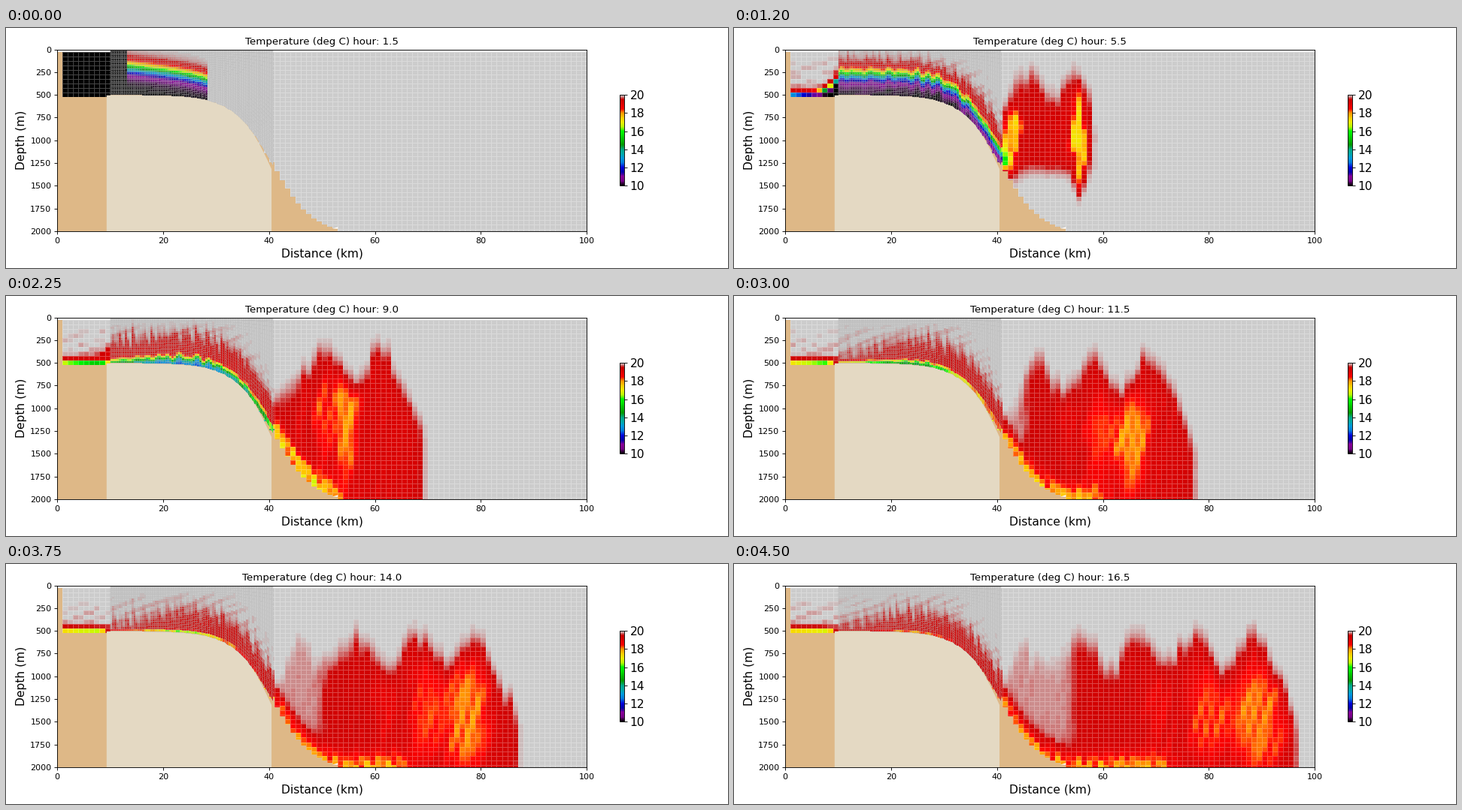
Animation, 960 px wide and 320 px high, one loop 4.65 s. Source, as a matplotlib script:

```python
import numpy as np
import matplotlib.pyplot as plt
from matplotlib.animation import FuncAnimation

FRAMES, STEP = 31, 150
W, H, DPI = 960, 320, 80
TAN, PALE = "#deb887", "#e4d9c3"
SPILL = 5.5  # hour when the shelf has emptied half way

rng = np.random.default_rng(4)
WAVES = rng.uniform([.6, .6, 0, -1.5], [3.2, 3, 2 * np.pi, 1.5], (8, 4))


def wiggle(x, z, t):
    return sum(np.sin(a * x + b * z + p + w * t) for a, b, p, w in WAVES) / 2


def sig(v):
    return 1 / (1 + np.exp(-np.clip(v, -40, 40)))


def ramp(v, a, b):
    return np.clip((v - a) / (b - a), 0, 1)


def fade(t, scale):
    return np.exp(-max(t - SPILL, 0) / scale)


def bell(v, centre, width):
    return np.exp(-((v - centre) / width) ** 2)


def blob(x, z, cx, cz, rx, rz):
    return np.exp(-(((x - cx) / rx) ** 2 + ((z - cz) / rz) ** 2) ** 2)


def bed(x):
    return np.minimum(500 + 770 * (1 + np.tanh((x - 40.8) / 7.6)), 2000)


def front(t):
    return np.interp(t, [1.5, 3.8, 5.5, 9, 11.5, 16.5],
                     [28.5, 40, 57.9, 69, 77.2, 96.5])


def exchange(x, t):
    """Height of the tilted interface while both fronts run apart."""
    edge = 20.85 - 5.1 * t
    tilt = 310 - 95 * ramp(x, edge, front(t)) - 110 * ramp(x, 29, 40)
    return np.where(x < edge, 900, tilt)


def drained(x, t):
    """Height, strength and width of the cold layer, and height of the mixed one."""
    late = t - SPILL
    top = 8 + 222 * fade(t, 3) * (1 - .55 * sig((x - 33) / 2.5))
    top = top * np.exp(-.4 * max(late, 0) * np.maximum((25 - x) / 15, 0) ** 2)
    amp = (10 - .6 * late) * (1 - .5 * sig((x - 30) / 2) * ramp(t, 8, 12))
    amp = amp * (1 - .42 * bell(x, 14, 6) * bell(t, 7.3, 1))
    lift = (340 - 10 * late) * (1 - .75 * ramp(t, 8, 11) * bell(x, 10, 9))
    width = 42 * fade(t, 6)

    # The basin behind the sill keeps only a thin layer
    sill = (np.minimum(x, 10) / 10) ** 6
    basin = x < 10
    top = np.where(basin, 45 + (top - 45) * sill, top)
    lift = np.where(basin, 95 + (lift - 95) * sill, lift)
    pool = 2.6 + 5 * fade(t, 1.5) + .6 * x * fade(t, 5)
    amp = np.where(basin, np.minimum(pool, 10), amp)
    width = np.where(basin, .3 * width, width)
    return top, amp, width, lift


def shelf(x, z, t, floor):
    """Temperature deficit on the shelf."""
    h = floor - z
    m = ramp(t, 3.7, SPILL)
    open_ = x >= 10
    top, amp, width, lift = drained(x, t)
    rough = .07 + .12 * ramp(t, SPILL, 8)
    top = top * (1 + rough * wiggle(1.1 * x, 0, t) * open_)
    lift = lift + 42 * wiggle(1.7 * x, h / 260, t) * open_

    top = exchange(x, t) * (1 - m) + top * m
    amp = 10 * (1 - m) + amp * m
    width = 42 * (1 - m) + width * m
    cold = amp * sig((top - h) / width)
    mix = m * (.8 - .2 * ramp(t, 9, 11)) * sig((lift - h) / np.where(open_, 45, 14))
    streak = np.clip(wiggle(.5 * x, z / 40, .5 * t), 0, 1)
    haze = .13 * m * streak * sig((z - 90) / 15) * sig((lift + 270 - h) / 50)
    return (np.maximum(cold, mix) + haze) * (x < front(t))


def cores(x, z, t):
    """Colder water inside the plume: a nose, trailing cores and a gap."""
    f = front(t)
    x = x + .5 * wiggle(.3 * x, z / 250, .6 * t)
    a = 1.8 * fade(t, 1.4) * blob(x, z, f - 2.3, 960, 1.2, 560)
    cx = f - 16.5 + abs(t - 7)
    cz = 800 + 700 * (1 - np.exp(-max(t - 7, 0) / 3))
    rx = max(1.2 + .42 * (t - 6), .9)
    for k, strength in enumerate((1, .75, .4)):
        a = a + (strength * (.95 + .9 * fade(t, 3)) * ramp(t, 4.2, SPILL)
                 * blob(x, z, cx - 1.7 * k * rx, cz - 60 * k,
                        rx * (1 - .25 * k), 640 - 110 * k))
    return a - .8 * bell(t, 7, .8) * blob(x, z, f - 9.3, 1650, 1.3, 650)


def plume_top(x, t):
    """Billows on a level that sinks with time and dips at both ends."""
    f = front(t)
    crest = f - 2 - 6 * ramp(t, 6, 9)
    level = min(420 + 45 * (t - SPILL), 780)
    top = level - 170 * np.cos(2 * np.pi * (x - crest) / 11)
    top = top + (300 + 450 * ramp(t, 6, 9)) * np.exp(-np.maximum(f - x, 0) / 2.2)
    top = top + 380 * np.exp(-np.maximum(x - 41, 0) / 2.5)
    return top + 50 * wiggle(2.3 * x, 0, t)


def deep(x, z, t):
    """Temperature deficit of the plume beyond the slope."""
    f = front(t)
    if f < 41:
        return np.zeros_like(x)
    h = bed(x) - z
    base = 1300 + 600 * max(t - SPILL, 0) + 280 * bell(x, f - 2.3, 1.3)
    body = sig((z - plume_top(x, t)) / 65) * sig((base - z) / 45)

    # Upstream the plume thins to a pale wake above a bottom layer
    keep = sig((x - max(40, 41 + 1.8 * (t - 9))) / .5)
    body = body * (keep + (1 - keep) * np.maximum(.3, sig((220 - h) / 40)))
    xi = (x - 41) / (f - 41)
    amp = .62 + .33 * sig((xi - .45) * 12) * sig((.93 - xi) * 30)
    a = body * np.maximum(amp + cores(x, z, t), 0)
    a = a * (1 + .07 * wiggle(x, z / 150, t))

    thick = 170 + 180 * bell(t, 6.8, 1.8)
    reach = 44 + 2.6 * (t - SPILL)
    a = a + ((1.2 + 2.8 * fade(t, 3)) * bell(h, 0, thick)
             * sig((reach - x) / 1.2) * sig((base - z) / 45)
             * (1 + .2 * wiggle(1.5 * x, z / 90, t)))
    return a * sig((f - x) / .3)


# Coarse 1 km grid, and a fine grid that follows the bed
cx, cz = np.arange(1, 101), np.r_[np.arange(25, 2000, 50), 2000]
CX, CZ = np.meshgrid(cx[:-1] + .5, np.arange(50, 2001, 50))
FX, FS = np.meshgrid(np.linspace(10, 40.8, 78), np.linspace(0, 1, 25))
FZ = FS * bed(FX)


def mid(a):
    return (a[1:, 1:] + a[:-1, 1:] + a[1:, :-1] + a[:-1, :-1]) / 4


MX, MZ = mid(FX), mid(FZ)


def coarse_temp(t):
    floor = np.where(CX < 10, 525, bed(CX))
    return 20 - np.where(CX < 40.8, shelf(CX, CZ, t, floor), deep(CX, CZ, t))


def fine_temp(t):
    return 20 - shelf(MX, MZ, t, bed(MX))


def box(x, y, w, h):
    return [x / W, 1 - (y + h) / H, w / W, h / H]


fig = plt.figure(figsize=(W / DPI, H / DPI), dpi=DPI, facecolor="white")
ax = fig.add_axes(box(68.15, 28.7, 704, 242.1), facecolor="#eeeeee")
look = dict(cmap="nipy_spectral", vmin=10, vmax=20)
coarse = ax.pcolormesh(cx, cz, coarse_temp(1.5), zorder=1, linewidth=.5,
                       edgecolors=(1, 1, 1, .28), **look)

cols = np.arange(0, 54)
tops = np.where(cols < 10, 525, bed(cols + .5))
tops[0], tops[53] = 25, 2000
ax.fill_between(cols, tops, 2000, step="post", color=TAN, lw=0, zorder=1.2)
ax.fill([52, 53, 53], [1972, 1955, 1974], color="white", lw=0, zorder=1.3)
px = np.linspace(9.25, 40.4, 120)
ax.fill_between(px, bed(px + .02 * np.maximum(px - 34, 0) ** 2), 2000,
                color=PALE, lw=0, antialiased=False, zorder=1.4)
fine = ax.pcolormesh(FX, FZ, fine_temp(1.5), zorder=1.5, linewidth=.3,
                     edgecolors=(.72, .72, .72, .25), **look)

ax.set(xlim=(0, 100), ylim=(2000, 0), xticks=range(0, 101, 20),
       yticks=range(0, 2001, 250))
ax.tick_params(labelsize=10)
ax.set_xlabel("Distance (km)", fontsize=14)
ax.set_ylabel("Depth (m)", fontsize=14)
title = ax.set_title("", fontsize=12)

cax = fig.add_axes(box(816, 89.2, 6, 121))
bar = fig.colorbar(plt.cm.ScalarMappable(plt.Normalize(10, 20), "nipy_spectral"),
                   cax=cax, ticks=range(10, 21, 2))
bar.ax.tick_params(labelsize=14)


def update(i):
    t = 1.5 + .5 * i
    coarse.set_array(coarse_temp(t))
    fine.set_array(fine_temp(t))
    title.set_text(f"Temperature (deg C) hour: {t:.1f}")
    return coarse, fine, title


anim = FuncAnimation(fig, update, frames=FRAMES, interval=STEP,
                     repeat=True, repeat_delay=0)
plt.show()
```
